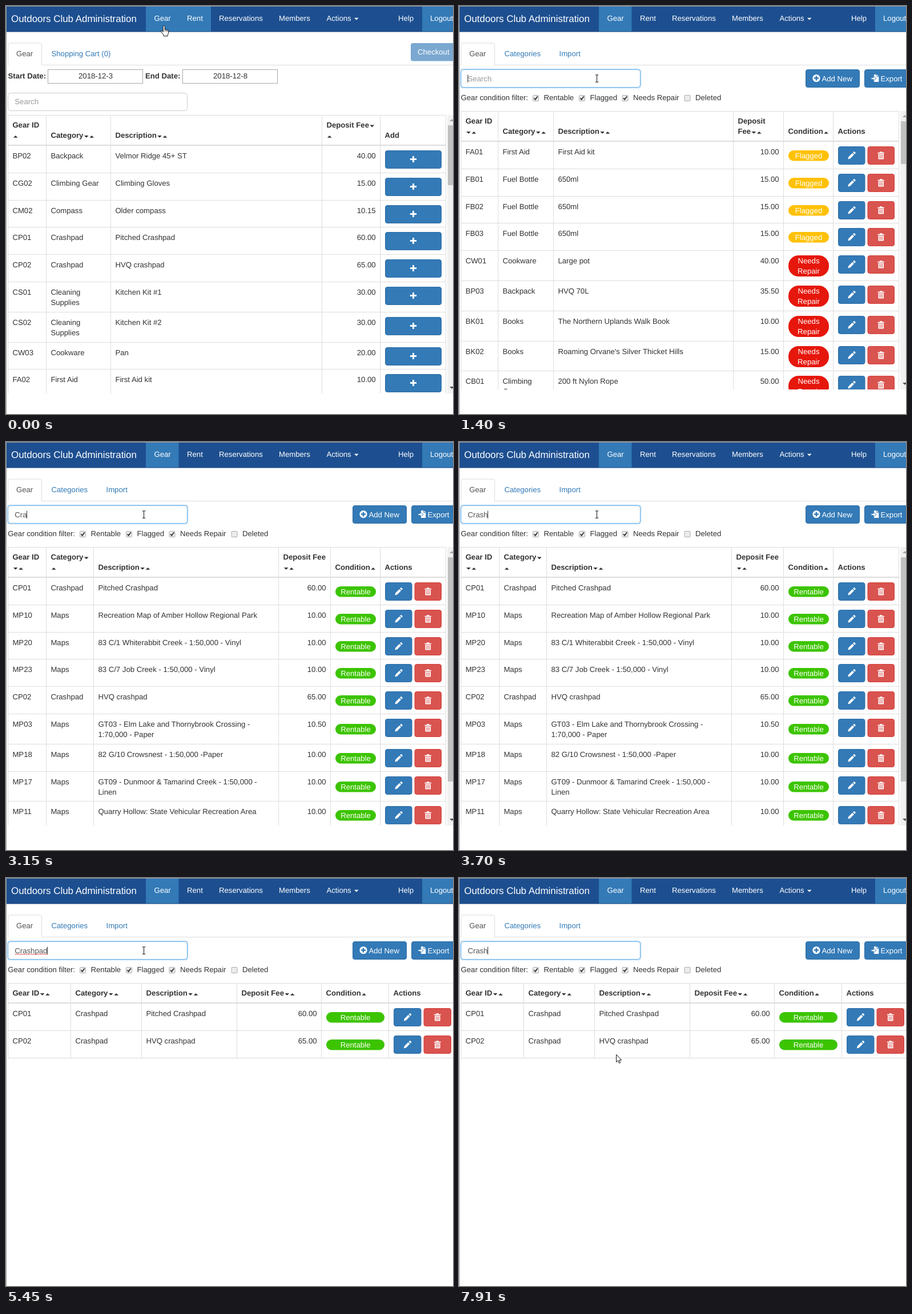
These frames come from a looping animation (783 by 715 pixels, 8 s). An HTML page:

```html
<!DOCTYPE html>
<html lang="en">
<head>
<meta charset="utf-8">
<title>Gear administration</title>
<style>
html, body { margin: 0; width: 100%; height: 100%; overflow: hidden; background: #fff; }
svg { display: block; width: 783px; height: 715px; }
text { font: 13.16px "Liberation Sans", Arial, sans-serif; fill: #333; white-space: pre; text-rendering: geometricPrecision; }
.b { font-weight: bold; }
.w { fill: #fff; }
.link { fill: #337ab7; }
.tab { fill: #555; }
.hint { fill: #999; }
.brand { font-size: 16.92px; fill: #fff; }
</style>
</head>
<body>
<svg id="stage" viewBox="0 0 783 715"></svg>
<script>
const LOOP = 8000;
const BLUE = '#337ab7', RED = '#d9534f', LINE = '#ddd';
const COLORS = { Flagged: '#ffc107', 'Needs|Repair': '#e6170c', Rentable: '#3cc400' };

const pen = document.createElement('canvas').getContext('2d');
function measure(s, weight = '') {
  pen.font = `${weight} 100px "Liberation Sans", Arial, sans-serif`;
  return pen.measureText(s).width * .1316;
}

const esc = s => s.replace(/&/g, '&amp;');
const text = (x, y, s, cls = '', anchor = 'start') =>
  `<text x="${x}" y="${y}" class="${cls}" text-anchor="${anchor}">${esc(s)}</text>`;
const rect = (x, y, w, h, fill, more = '') =>
  `<rect x="${x}" y="${y}" width="${w}" height="${h}" fill="${fill}" ${more}/>`;
const path = (d, fill, more = '') => `<path d="${d}" fill="${fill}" ${more}/>`;
const at = (x, y, body) => `<g transform="translate(${x} ${y})">${body}</g>`;
const box = (x, y, w, h, stroke, r = 0) =>
  rect(x + .5, y + .5, w - 1, h - 1, '#fff', `stroke="${stroke}" rx="${r}"`);
const button = (x, y, w, h, fill = BLUE, edge = '#2e6da4') =>
  rect(x + .5, y + .5, w - 1, h - 1, fill, `stroke="${edge}" rx="3.5"`);
const caret = (x, y, up) =>
  path(up ? `M${x - 3.8} ${y + 3.8}h7.6l-3.8-3.8z` : `M${x - 3.8} ${y}h7.6l-3.8 3.8z`, '#333');

const plus = (size, thick, fill) =>
  path(`M${-size} 0h${2 * size}M0 ${-size}v${2 * size}`, 'none', `stroke="${fill}" stroke-width="${thick}"`);
const pencil = path('M-6.5 6.5l1.1-4 6.8-6.8 2.9 2.9-6.8 6.8z' +
  'M2.3-5.2l1.3-1.3q.9-.8 1.8 0l1.1 1.1q.8.9 0 1.8l-1.3 1.3z', '#fff');
const trash = path('M-5.8-5.2h3.6v-1.6h4.4v1.6h3.6v1.8h-11.6zM-4.8-2.6h9.6v8q0 1.2-1.2 1.2h-7.2q-1.2 0-1.2-1.2z', '#fff') +
  path('M-2.4-1.2v6.2M0-1.2v6.2M2.4-1.2v6.2', 'none', `stroke="${RED}" stroke-width="1"`);
const exportIcon = path('M-1.5-6.5h5l3.3 3.3v9.7h-8.3z', '#fff') +
  path('M3.2-6.5v3.6h3.6', 'none', `stroke="${BLUE}"`) +
  path('M-6.5-1h4v-2.7l5 4.2-5 4.2v-2.7h-4z', '#fff', `stroke="${BLUE}" stroke-width=".9"`);

function nav(rentActive) {
  const items = [[259.5, 'Gear'], [317, 'Rent'], [373, 'Reservations'], [478, 'Members'],
    [561.5, 'Actions'], [687, 'Help'], [743, 'Logout']];
  return rect(0, 1, 783, 44, '#1d4f90') + rect(245, 1, rentActive ? 114 : 57.5, 44, BLUE) +
    rect(729, 1, 54, 44, BLUE) + rect(0, 44.5, 783, 1, '#1a4680') +
    text(9, 27.5, 'Outdoors Club Administration', 'brand') +
    items.map(([x, s]) => text(x, 26, s, 'w')).join('') +
    path('M610 20.8h7.6l-3.8 3.8z', '#fff');
}

function tabs(...links) {
  return rect(3, 103, 780, 1, LINE) +
    path('M3.5 104V69q0-4 4-4h51q4 0 4 4v35', '#fff', `stroke="${LINE}"`) +
    text(18, 88, 'Gear', 'tab') + links.map(([x, s]) => text(x, 88, s, 'link')).join('');
}

function scrollbar(top, bottom, thumb, size) {
  return rect(773, top, 10, bottom - top, '#f1f1f1') + rect(774, thumb, 9, size, '#c1c1c1') +
    path(`M777 ${top + 11}h8l-4-4z`, '#a3a3a3') + path(`M777 ${bottom - 12}h8l-4 4z`, '#505050');
}

// In headings "v" and "^" after a bar stand for the sort arrows.
function heading(x, base, spec) {
  const [label, arrows = ''] = spec.split('|');
  const start = x + measure(label, 'bold') + 5.3;
  return text(x, base, label, 'b') +
    [...arrows].map((a, i) => caret(start + i * 9.4, base - 4.3, a === '^')).join('');
}

function badge(x, y, w, label, tall) {
  const lines = label.split('|'), two = lines.length > 1;
  const top = y + (two ? 8 : tall ? 17 : 15), h = two ? 37 : 18.5;
  return rect(x, top, w, h, COLORS[label], `rx="${two ? 18 : 9.25}"`) +
    lines.map((s, i) => text(x + w / 2, top + 13.6 + i * 18.4, s, 'w', 'middle')).join('');
}

function table({ id, top, body, bottom, cols, head, rows }) {
  const n = cols.length, inner = i => cols[i] + 8.4;
  let out = '', y = body;
  head.forEach((lines, i) => lines.forEach((s, k) =>
    out += heading(inner(i), body - 13.7 - 18.4 * (lines.length - 1 - k), s)));
  for (const [code, cat, desc, fee, state] of rows) {
    const tall = [cat, desc, state || ''].some(s => s.includes('|'));
    const ry = Math.round(y), base = ry + 21.6;
    const x = cols[n - 2] + 9, w = cols[n - 1] - 7 - x;
    [code, cat, desc].forEach((cell, i) => cell.split('|').forEach((s, k) =>
      out += text(inner(i), base + 18.4 * k, s)));
    out += text(cols[4] - 7.4, base, fee, '', 'end');
    if (state) {
      const half = (w - 4) / 2, right = x + half + 4;
      out += badge(cols[4] + 9, ry, cols[5] - cols[4] - 16, state, tall) +
        button(x, ry + 8, half, 32) + at(x + half / 2, ry + 24, pencil) +
        button(right, ry + 8, half, 32, RED, '#d43f3a') + at(right + half / 2, ry + 24, trash);
    } else {
      out += button(x, ry + 8, w, 32) + at(x + w / 2, ry + 23.5, plus(5.6, 3, '#fff'));
    }
    y += tall ? 52.8 : 47.8;
    out += rect(3, Math.round(y) - 1, cols[n - 1] - 2, 1, LINE);
  }
  const end = Math.min(bottom, Math.round(y));
  out += rect(3, top, cols[n - 1] - 2, 1, LINE) + rect(3, body - 2, cols[n - 1] - 2, 2, LINE) +
    cols.map(x => rect(x, top, 1, end - top, LINE)).join('');
  return `<clipPath id="${id}">${rect(0, 0, 783, bottom, '#000')}</clipPath><g clip-path="url(#${id})">${out}</g>`;
}

const pads = [
  ['CP01', 'Crashpad', 'Pitched Crashpad', '60.00', 'Rentable'],
  ['CP02', 'Crashpad', 'HVQ crashpad', '65.00', 'Rentable']
];
const map = (code, desc, fee = '10.00') => [code, 'Maps', desc, fee, 'Rentable'];
const bottle = code => [code, 'Fuel Bottle', '650ml', '15.00', 'Flagged'];

const rentTable = {
  id: 'rent', top: 191, body: 245, bottom: 679, cols: [3, 70, 183, 553, 655, 770],
  head: [['Gear ID', '|^'], ['Category|v^'], ['Description|v^'], ['Deposit Fee|v', '|^'], ['Add']],
  rows: [
    ['BP02', 'Backpack', 'Velmor Ridge 45+ ST', '40.00'],
    ['CG02', 'Climbing Gear', 'Climbing Gloves', '15.00'],
    ['CM02', 'Compass', 'Older compass', '10.15'],
    ...pads.map(p => p.slice(0, 4)),
    ['CS01', 'Cleaning|Supplies', 'Kitchen Kit #1', '30.00'],
    ['CS02', 'Cleaning|Supplies', 'Kitchen Kit #2', '30.00'],
    ['CW03', 'Cookware', 'Pan', '20.00'],
    ['FA02', 'First Aid', 'First Aid kit', '10.00']
  ]
};
const allTable = {
  id: 'all', top: 184, body: 238, bottom: 672, cols: [3, 68, 165, 480, 568, 655, 770],
  head: [['Gear ID', '|v^'], ['Category|v^'], ['Description|v^'], ['Deposit', 'Fee|v^'], ['Condition|^'], ['Actions']],
  rows: [
    ['FA01', 'First Aid', 'First Aid kit', '10.00', 'Flagged'],
    bottle('FB01'), bottle('FB02'), bottle('FB03'),
    ['CW01', 'Cookware', 'Large pot', '40.00', 'Needs|Repair'],
    ['BP03', 'Backpack', 'HVQ 70L', '35.50', 'Needs|Repair'],
    ['BK01', 'Books', 'The Northern Uplands Walk Book', '10.00', 'Needs|Repair'],
    ['BK02', 'Books', "Roaming Orvane's Silver Thicket Hills", '15.00', 'Needs|Repair'],
    ['CB01', 'Climbing|Gear', '200 ft Nylon Rope', '50.00', 'Needs|Repair']
  ]
};
const mapTable = {
  id: 'maps', top: 184, body: 238, bottom: 672, cols: [3, 70, 153, 477, 568, 655, 770],
  head: [['Gear ID', '|v^'], ['Category|v', '|^'], ['Description|v^'], ['Deposit Fee', '|v^'], ['Condition|^'], ['Actions']],
  rows: [
    pads[0],
    map('MP10', 'Recreation Map of Amber Hollow Regional Park'),
    map('MP20', '83 C/1 Whiterabbit Creek - 1:50,000 - Vinyl'),
    map('MP23', '83 C/7 Job Creek - 1:50,000 - Vinyl'),
    pads[1],
    map('MP03', 'GT03 - Elm Lake and Thornybrook Crossing -|1:70,000 - Paper', '10.50'),
    map('MP18', '82 G/10 Crowsnest - 1:50,000 -Paper'),
    map('MP17', 'GT09 - Dunmoor & Tamarind Creek - 1:50,000 -|Linen'),
    map('MP11', 'Quarry Hollow: State Vehicular Recreation Area')
  ]
};
const padTable = {
  id: 'pads', top: 184, body: 220, bottom: 672, cols: [3, 113, 237, 404, 552, 670, 787],
  head: [['Gear ID|v^'], ['Category|v^'], ['Description|v^'], ['Deposit Fee|v^'], ['Condition|^'], ['Actions']],
  rows: pads
};

function rentPage() {
  return nav(true) + tabs([79.5, 'Shopping Cart (0)']) +
    rect(709, 65, 90, 31.5, '#7aa8d0', 'rx="4"') + text(721, 84.5, 'Checkout', 'w') +
    text(3.5, 127.3, 'Start Date:', 'b') + box(73, 111, 167, 25, '#a9a9a9') + text(157, 127.3, '2018-12-3', '', 'middle') +
    text(244, 127.3, 'End Date:', 'b') + box(309, 111, 167, 25, '#a9a9a9') + text(393, 127.3, '2018-12-8', '', 'middle') +
    box(3, 152, 315, 32, '#ccc', 4) + text(15.3, 171.7, 'Search', 'hint') +
    table(rentTable) + scrollbar(191, 679, 209, 105);
}

function checkbox(x, label, on) {
  return rect(x - 5, 156.5, 10, 10, '#ececec', 'stroke="#adadad" rx="1"') +
    (on ? path(`M${x - 3} 161.3l2.2 2.6 4-5.6`, 'none', 'stroke="#3c3c3c" stroke-width="1.9"') : '') +
    text(x + 14, 165, label);
}

function gearPage() {
  return nav(false) + tabs([79.5, 'Categories'], [175.5, 'Import']) +
    button(607, 111, 95, 32) + at(626, 126.5, '<circle r="6.6" fill="#fff"/>' + plus(4, 2.4, BLUE)) +
    text(635.5, 131.5, 'Add New', 'w') +
    button(710, 111, 90, 32) + at(728.5, 126.5, exportIcon) + text(738.5, 131.5, 'Export', 'w') +
    text(3.3, 165, 'Gear condition filter:') + checkbox(134.5, 'Rentable', true) + checkbox(215.5, 'Flagged', true) +
    checkbox(291, 'Needs Repair', true) + checkbox(400, 'Deleted', false) +
    box(3, 111, 315, 32, '#ccc', 4) +
    `<g id="focus">${rect(3, 111, 315, 32, 'none', 'rx="4" stroke="#66afe9" stroke-opacity=".35" stroke-width="3"')}${box(3, 111, 315, 32, '#66afe9', 4)}</g>` +
    text(15.3, 131.5, '', 'tab').replace('<text', '<text id="query"') + rect(15, 120.5, 1, 13.5, '#333', 'id="bar"') +
    path('M15 133' + 'l1.5 1.4l1.5-1.4'.repeat(19), 'none', 'id="wave" stroke="#e0322a" stroke-width=".9"');
}

const outline = 'stroke="#111" stroke-width="1" stroke-linejoin="round"';
const cursors = {
  hand: path('M4.2 11.5V2q0-1.6 1.5-1.6T7.2 2v5.2q1.4-.8 2.3.4 1.4-.6 2.1.5 2-.2 2 1.6v4l-1.5 3.2v1.8H5.2v-1.8L.8 11.4q-.7-1.8 1-2 .9 0 2.4 2.1z', '#fff', outline) +
    path('M7.2 7v3.6M9.5 7.8v3M11.6 8.4v2.6', 'none', 'stroke="#111" stroke-width=".8"'),
  arrow: path('M.6.6v13l3-2.8 2 4.8 2.1-.9-2-4.6h4z', '#fff', outline),
  beam: path('M-2.8-6.2h2l.8.7.8-.7h2M0-5.5v11M-2.8 6.2h2l.8-.7.8.7h2', 'none', 'stroke="#222" stroke-width="1.1"')
};

const group = (id, body) => `<g id="${id}">${body}</g>`;
const stage = document.getElementById('stage');
stage.innerHTML = rect(0, 0, 783, 715, '#fff') +
  group('rentPage', rentPage()) + group('gearPage', gearPage()) +
  group('allRows', table(allTable) + scrollbar(184, 672, 202, 75)) +
  group('mapRows', table(mapTable) + scrollbar(184, 672, 202, 393)) +
  group('padRows', table(padTable)) +
  rect(0, 0, 783, 1, '#a0a0a0') + rect(0, 0, 1, 715, '#a0a0a0') +
  Object.keys(cursors).map(k => group(k, cursors[k])).join('');

// Each track lists [start time, value...] and holds until the next entry.
const scene = [[0, 'rentPage'], [270, 'allRows'], [3150, 'mapRows'], [3820, 'padRows']];
const typed = [[0, ''], [2600, 'C'], [2880, 'Cr'], [3150, 'Cra'], [3420, 'Cras'], [3700, 'Crash'], [3820, 'Crashp'],
  [3940, 'Crashpa'], [4340, 'Crashpad'], [7200, 'Crashpa'], [7630, 'Crashp'], [7910, 'Crash']];
const blink = [[0, 0], [1400, 1], [1800, 0], [2330, 1], [4890, 0], [5450, 1], [5960, 0], [6390, 1],
  [6950, 0], [7200, 1], [7480, 0], [7630, 1]];
const pointer = [[0, 'hand', 271, 34], [700, 'arrow', 268, 58], [820, 'arrow', 254, 84], [980, 'beam', 246, 114],
  [1100, 'beam', 241.5, 124], [1250, 'beam', 241.5, 127], [5570, 'arrow', 249.5, 158], [5720, 'arrow', 267, 207],
  [5840, 'arrow', 282.5, 258], [5960, 'beam', 284, 294.5], [6110, 'arrow', 279, 312], [6390, 'arrow', 275, 309]];

const now = (track, t) => track.findLast(step => step[0] <= t).slice(1);
const el = id => document.getElementById(id);
const show = (id, on) => el(id).setAttribute('visibility', on ? 'visible' : 'hidden');

function draw() {
  const t = performance.now() % LOOP;
  const [view] = now(scene, t), [word] = now(typed, t), [lit] = now(blink, t);
  const [kind, x, y] = now(pointer, t);
  const gear = view !== 'rentPage';
  for (const id of ['rentPage', 'allRows', 'mapRows', 'padRows']) show(id, id === view);
  show('gearPage', gear);
  show('focus', t >= 1400);
  show('bar', lit);
  show('wave', t >= 5450 && t < 7200);
  el('query').textContent = word || 'Search';
  el('query').setAttribute('class', word ? 'tab' : 'hint');
  el('bar').setAttribute('x', Math.round(15 + measure(word)));
  for (const k in cursors) show(k, k === kind);
  el(kind).setAttribute('transform', `translate(${x} ${y})`);
  requestAnimationFrame(draw);
}
draw();
</script>
</body>
</html>
```
